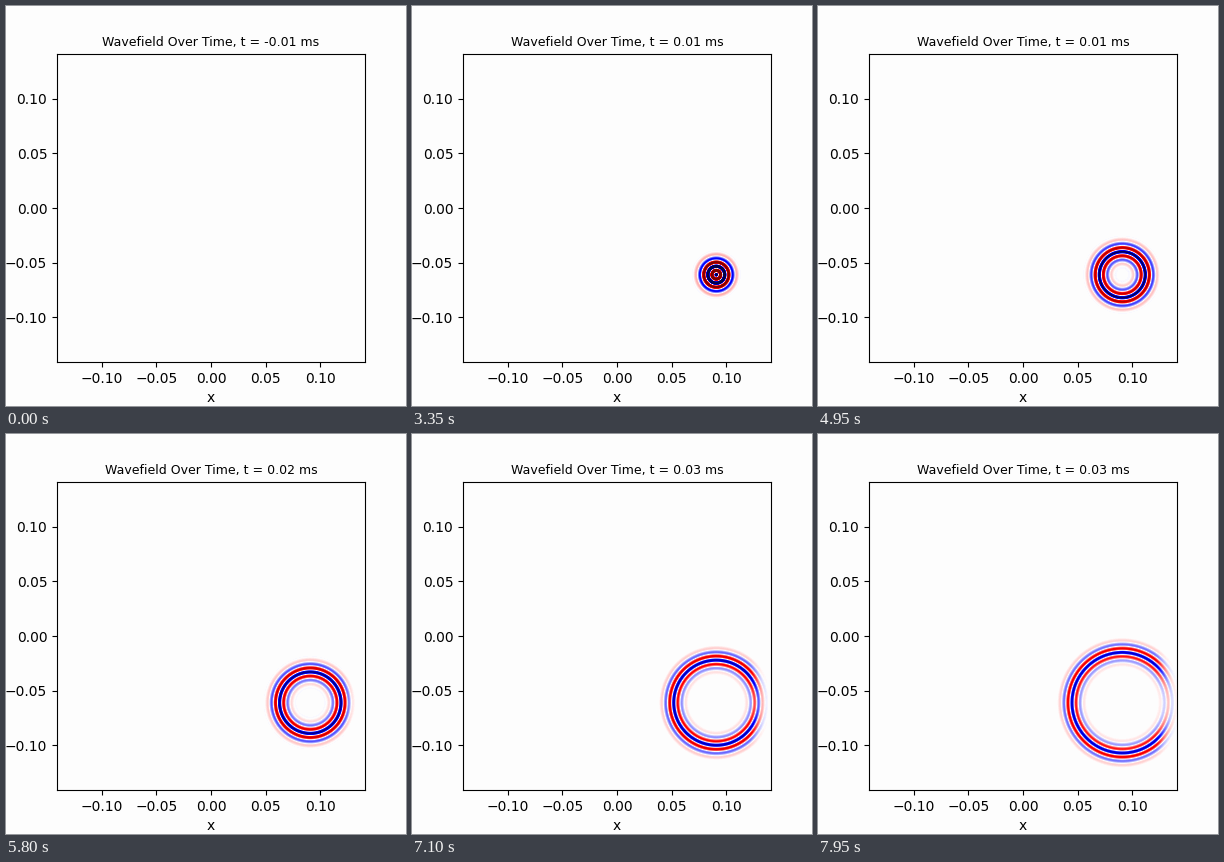
These frames come from a looping animation (400 by 400 pixels, 8000 ms). A matplotlib script:

```python
import numpy as np
import matplotlib.pyplot as plt
from matplotlib.animation import FuncAnimation

FRAMES, INTERVAL = 160, 50
PAPER = "#fdfdfd"
HALF = 0.141              # half width of the domain
SIZE = 308                # plot side in pixels
SPEED = 0.455             # wave travel in pixels per frame
WAVELENGTH = 8.17         # pixels
PEAK = 46.25              # frame at which the pulse peaks
ZERO, STEP_MS = 48.4, 0.000278
GAIN = 3.25
CENTER = (253.3, 220.7)   # pixels from the top left of the plot

# Distance of every pixel from the wave's center
px = np.arange(SIZE) + 0.5
X, Y = np.meshgrid(px, px)
dist = np.hypot(X - CENTER[0], Y - CENTER[1])

# Absorbing layer along the edges
LAYER = 24
edge = np.minimum(np.minimum(X, SIZE - X), np.minimum(Y, SIZE - Y))
depth = np.clip((LAYER - edge) / LAYER, 0, 1)
damping = np.exp(-3.4 * depth**2)

# The 2D wave is the pulse summed over delays r * cosh(theta)
radius = np.arange(0.4, 72, 0.25)
theta = np.linspace(0, 6, 481)
weight = np.full(theta.size, theta[1])
weight[0] /= 2
delay = radius[:, None] * np.cosh(theta) / WAVELENGTH


def pulse(s):
    wave = -np.exp(-s**2) * np.cos(2 * np.pi * s)
    return np.where(s > -1.88, wave, 0)


def wavefield(i):
    now = SPEED * (i - PEAK) / WAVELENGTH
    profile = GAIN * pulse(now - delay) @ weight
    field = np.interp(dist, radius, profile, right=0) * damping
    return np.ma.masked_where(np.abs(field) < 0.008, field)


fig, ax = plt.subplots(figsize=(4, 4), dpi=100, facecolor=PAPER)
ax.set_facecolor(PAPER)
cmap = plt.get_cmap("seismic").copy()
cmap.set_bad(PAPER)
image = ax.imshow(wavefield(0), cmap=cmap, vmin=-1, vmax=1,
                  extent=(-HALF, HALF, -HALF, HALF), interpolation="nearest")
ticks = np.linspace(-0.1, 0.1, 5)
ax.set_xticks(ticks)
ax.set_yticks(ticks)
ax.set_xlabel("x")
title = ax.set_title("", fontsize=9)


def update(i):
    image.set_data(wavefield(i))
    title.set_text(f"Wavefield Over Time, t = {(i - ZERO) * STEP_MS:.2f} ms")
    return image, title


anim = FuncAnimation(fig, update, frames=FRAMES, interval=INTERVAL,
                     repeat=True, repeat_delay=0)
plt.show()
```
